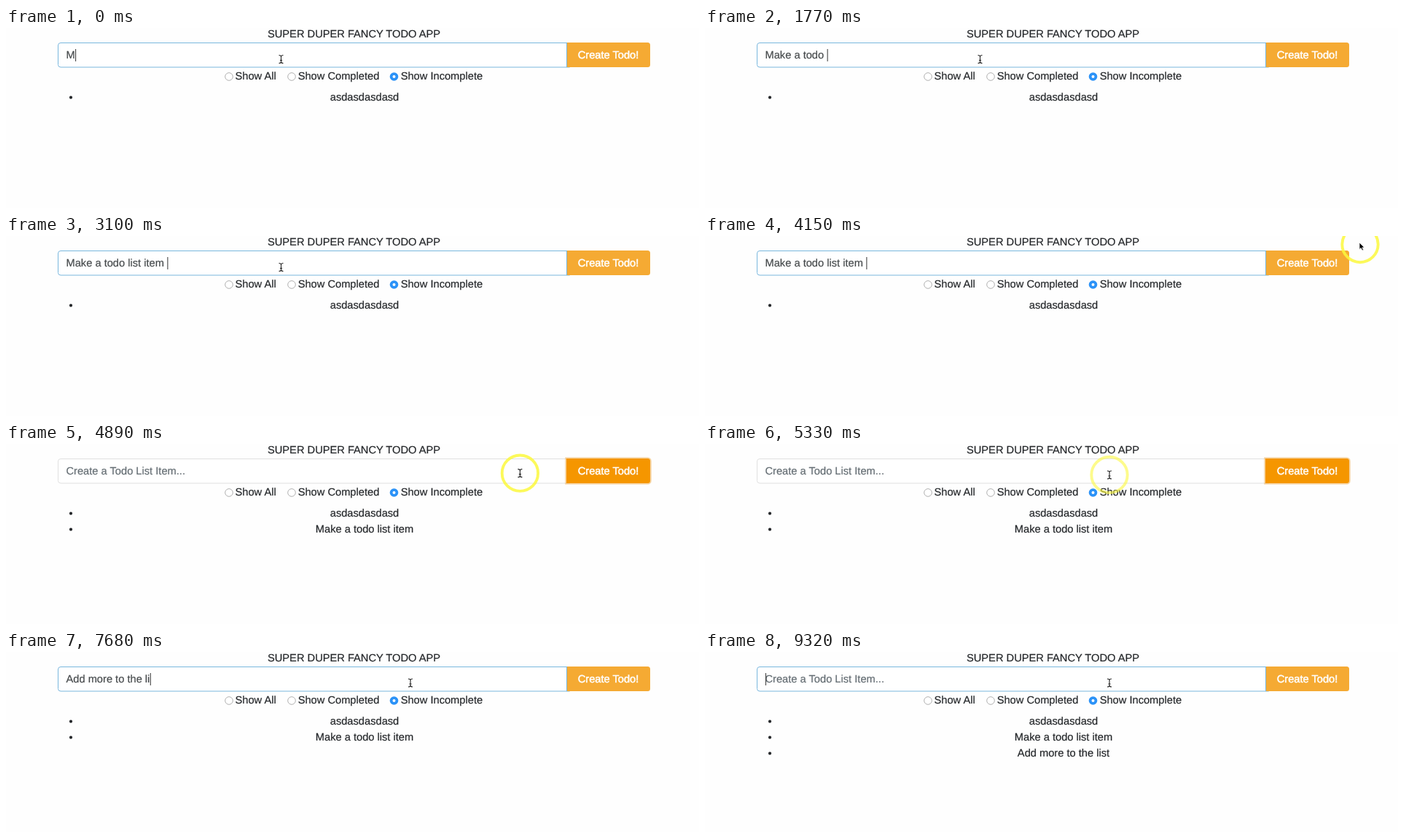
An HTML page that plays this animation: 951 px wide and 248 px high, repeating every 9420 ms.

```html
<!DOCTYPE html>
<html lang="en">
<head>
<meta charset="utf-8">
<title>Todo app</title>
<style>
  html, body { margin: 0; width: 100%; height: 100%; overflow: hidden; background: #fefefe; }
  svg { display: block; width: 951px; height: 248px; }
  text {
    font: 14.667px "Liberation Sans", Arial, sans-serif;
    font-kerning: normal; text-rendering: geometricPrecision; white-space: pre;
    color: #24272a; fill: currentColor; stroke: currentColor; stroke-width: .2;
  }
  .mid { text-anchor: middle; }
  .radio { fill: #fff; stroke: #a9a9a9; stroke-width: .9; }
  #button { stroke: rgba(240, 173, 78, .5); paint-order: stroke; }
</style>
</head>
<body>
<svg viewBox="0 0 951 248">
  <text class="mid" x="477.5" y="13">SUPER DUPER FANCY TODO APP</text>

  <rect id="field" x="71.5" y="20.5" width="705" height="33.5" rx="3.5" fill="#fff"/>
  <text id="entry" x="82.5" y="42"></text>
  <rect id="caret" y="29" width="1" height="17" fill="#333"/>
  <path id="button" d="M769 20H880.5a3.5 3.5 0 0 1 3.5 3.5v27a3.5 3.5 0 0 1-3.5 3.5H769z"/>
  <path id="divider" d="M769.5 20V54" stroke="#79b7de"/>
  <text class="mid" x="826.5" y="42" style="color:#fff;stroke-width:.5">Create Todo!</text>

  <circle class="radio" cx="306" cy="67" r="5.3"/>
  <text x="314.5" y="70.6">Show All</text>
  <circle class="radio" cx="392" cy="67" r="5.3"/>
  <text x="400.7" y="70.6">Show Completed</text>
  <circle cx="532.5" cy="67" r="5.8" fill="#2b92f7"/>
  <circle cx="532.5" cy="67" r="2" fill="#fff"/>
  <text x="541.7" y="70.6">Show Incomplete</text>

  <g id="list"></g>

  <g id="meter">
    <rect x="895" y="198" width="25" height="52" rx="2"/>
    <rect x="903" y="211" width="8" height="37" fill="#1b89c8"/>
    <rect x="903.5" y="205.5" width="7" height="5.5" stroke="#777"/>
  </g>

  <circle id="ripple" cx="555.5" cy="42.5" fill="none" stroke="#b9b9d0" stroke-width="2.3"/>
  <g id="mouse">
    <circle id="halo" r="24.7" fill="none" stroke="#fcf83e" stroke-width="3.9"/>
    <path id="beam" d="M-3-5.5Q0-5.5 0-3.5Q0-5.5 3-5.5M0-4V4M-3 5.5Q0 5.5 0 3.5Q0 5.5 3 5.5M-1.5 1.5H1.5" fill="none" stroke="#222" stroke-width="1.1"/>
    <path id="arrow" d="M-1-2.5V7L1.2 5L2.8 8.6L4.6 7.8L3 4.4H6z" stroke="#fff" stroke-width=".8"/>
  </g>
</svg>
<script>
const LOOP = 9420, STEP = 147.9, BLINK = 444;
const SUBMIT = 4600, FOCUS = 5340, CLICK = 5770, SUBMIT_AGAIN = 8430;
const FIRST = 'Make a todo list item ', SECOND = 'Add more to the list ';

const $ = id => document.getElementById(id);
const set = (id, attrs) => {
  for (const k in attrs) $(id).setAttribute(k, attrs[k]);
};
const show = (id, on) => set(id, { visibility: on ? 'visible' : 'hidden' });
const mix = (a, b, p) => a + (b - a) * p;
const progress = (t, start, end) => Math.min(1, Math.max(0, (t - start) / (end - start || 1)));
const ease = p => p * p * (3 - 2 * p);

$('list').innerHTML = ['asdasdasdasd', FIRST.trim(), SECOND.trim()].map((s, i) => `<g id="item${i}">
  <circle cx="89" cy="${95.7 + 22 * i}" r="2.1" fill="#24272a"/>
  <text class="mid" x="492" y="${100 + 22 * i}">${s}</text></g>`).join('');

// Bursts of typing at an even pace; from and to count letters.
const burst = (start, end, text, from = 0, to = 0) => ({ start, end, text, from, to });
const bursts = [
  burst(0, 580, 'Make a T', 1, 8),
  burst(880, 1330, FIRST, 7, 11),
  burst(1770, 3100, FIRST, 12, FIRST.length),
  burst(SUBMIT, FOCUS, ''),
  burst(6210, 7980, SECOND, 1, SECOND.length),
  burst(SUBMIT_AGAIN, SUBMIT_AGAIN, '')
];

// The pointer eases from stop to stop.
const stops = [
  { t: 3400, x: 377.5, y: 43 },
  { t: 4140, x: 899, y: 11.5 },
  { t: 4585, x: 846, y: 38 },
  { t: 5190, x: 555, y: 42.5 }
];

function pointer(t) {
  const i = Math.max(1, stops.findIndex(s => s.t > t));
  const b = t >= stops.at(-1).t ? stops.at(-1) : stops[i];
  const a = stops[stops.indexOf(b) - 1];
  const p = ease(progress(t, a.t, b.t));
  return [mix(a.x, b.x, p), mix(a.y, b.y, p)];
}

function drawEntry(t, step, focused) {
  const { start, end, text, from, to } = bursts.findLast(b => b.start <= t);
  const typed = text.slice(0, Math.round(mix(from, to, progress(step, start, end))));
  const entry = $('entry');
  entry.textContent = typed;
  const width = typed && entry.getComputedTextLength();
  entry.textContent = typed || 'Create a Todo List Item...';
  entry.style.color = typed ? '#464a4c' : '#636c72';
  set('caret', { x: 82.9 + +width });
  show('caret', focused && (t < end || Math.floor((t - end) / BLINK) % 2 === 0));
}

function drawPointer(t, step) {
  const [x, y] = pointer(step);
  const overField = x < 769 && y > 20;
  set('mouse', { transform: `translate(${x} ${y})` });
  set('halo', { opacity: t < 3550 ? 0 : .85 * progress(step, 5630, 5190) });
  show('beam', overField);
  show('arrow', !overField);

  const spread = progress(step, 6060, 6500);
  set('ripple', { r: 14 + 12 * spread, opacity: t < CLICK ? 0 : .55 * (1 - spread) });
}

function draw(t) {
  const step = Math.floor((t + 12) / STEP) * STEP;
  const focused = t < SUBMIT || t >= FOCUS;
  set('field', { stroke: focused ? '#79b7de' : '#e0e0e0' });
  set('button', { fill: focused ? '#f5aa33' : '#f59600', 'stroke-width': focused ? 0 : 3.6 });
  show('divider', focused);
  show('item1', t >= SUBMIT);
  show('item2', t >= SUBMIT_AGAIN);
  show('meter', t >= 2070 && t < 2510);
  drawEntry(t, step, focused);
  drawPointer(t, step);
}

const start = performance.now();
function tick() {
  draw((performance.now() - start) % LOOP);
  requestAnimationFrame(tick);
}
tick();
</script>
</body>
</html>
```
